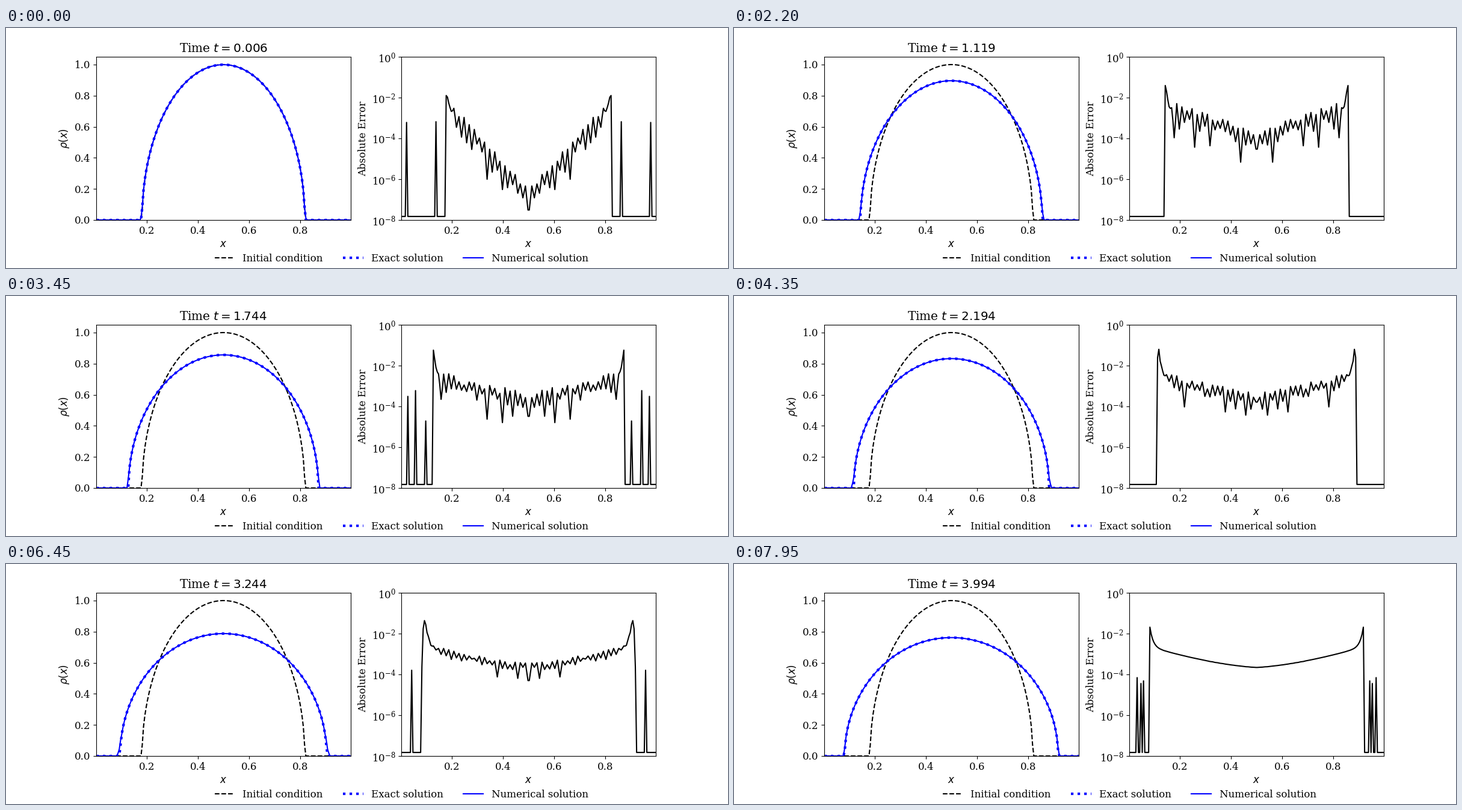
A matplotlib script for the animation above (8 s loop, 1200 by 400 pixels).

```python
import numpy as np
import matplotlib.pyplot as plt
from matplotlib.animation import FuncAnimation

plt.rcParams.update({"font.family": "DejaVu Serif", "font.size": 12})

FRAMES, INTERVAL = 160, 50
STEPS, T_END = 320, 4.0
N = 200
FLOOR = np.log10(1.49e-8)
x = (np.arange(N) + 0.5) / N
dist = np.abs(x - 0.5)
ring = np.floor(dist * N)  # cell index counted from the centre


def time_at(n):
    step = np.ceil(n * (STEPS - 1) / (FRAMES - 1))
    return (step + 0.5) * T_END / STEPS


def half_width(t):
    return (1 + 0.493 * t) ** 0.25 / np.pi


def profile(t):
    """Self-similar solution: a half ellipse that spreads and keeps its mass."""
    w = half_width(t)
    return np.sqrt(np.clip(1 - (dist / w) ** 2, 0, None)) / (np.pi * w)


def zigzag(rng):
    """Mirror-symmetric jags: modest crests between troughs of uneven depth."""
    knots = np.arange(0, N // 2 + 2, 2)
    height = np.where(knots % 4 == 0, -rng.exponential(0.9, knots.size),
                      rng.uniform(0.2, 1.0, knots.size))
    return np.interp(ring, knots, np.clip(height, -2.5, 1))


def log_error(n, t):
    rng = np.random.default_rng(100 + n)
    w = half_width(t)
    s = np.minimum(dist / w, 1)

    # Bulk error, with a dip at the centre that fades and narrows
    dip = 3.3 * np.exp(-t / 0.65) * (1 - s) ** (1.2 + 3 * t)
    bulk = -3.65 + s ** 1.5 - dip
    rough = 0.55 * (1 - (t / T_END) ** 3) * np.clip((1 - s) / 0.1, 0, 1)

    # Sharp peak at the front, then a short diffused tail
    peak = -1.9 + 0.7 * np.sin(np.pi * t / 4.5)
    front = (peak + 2.65) * np.exp((s - 1) / 0.03)
    beyond = np.floor((dist - w) * N + 0.2)
    tail = round(2 * np.exp(-((t - 2.9) / 0.8) ** 2))
    drop = 0.4 * np.clip(beyond, 0, None) ** 2.5
    result = np.where(beyond <= tail, bulk + front + rough * zigzag(rng) - drop, FLOOR)

    for _ in range(rng.integers(0, 4)):
        i = int(rng.uniform(0.02, 0.48 - w) * N)
        result[[i, N - 1 - i]] = rng.uniform(-5, -3)
    return np.maximum(result, FLOOR)


fig, (ax, ax_err) = plt.subplots(1, 2, figsize=(12, 4), dpi=100)
fig.subplots_adjust(left=0.125, right=0.9, bottom=0.2, top=0.88, wspace=0.2)

ax.plot(x, profile(0), "k--", label="Initial condition")
exact, = ax.plot([], [], "b:", lw=3, label="Exact solution")
numerical, = ax.plot([], [], "b-", label="Numerical solution")
ax.set(ylim=(0, 1.05), ylabel=r"$\rho(x)$")
title = ax.set_title("")
ax.legend(loc="upper center", bbox_to_anchor=(1.2, -0.15), ncol=3, frameon=False)

error, = ax_err.semilogy([], [], "k-")
ax_err.set(ylim=(1e-8, 1), ylabel="Absolute Error")
ax_err.set_yticks(10.0 ** np.arange(-8, 1, 2))
ax_err.minorticks_off()
for a in (ax, ax_err):
    a.set(xlim=(x[0], x[-1]), xlabel="$x$", xticks=[0.2, 0.4, 0.6, 0.8])


def update(n):
    t = time_at(n)
    rho = profile(t)
    err = 10 ** log_error(n, t)
    near_front = np.abs(dist - half_width(t)) * N < 4
    exact.set_data(x, rho)
    numerical.set_data(x, rho + np.where(near_front & (rho < 0.08), err, 0))
    error.set_data(x, err)
    title.set_text(f"Time $t = {t:.3f}$")
    return exact, numerical, error, title


anim = FuncAnimation(fig, update, frames=FRAMES, interval=INTERVAL,
                     repeat=True, repeat_delay=0, blit=False)
plt.show()
```
